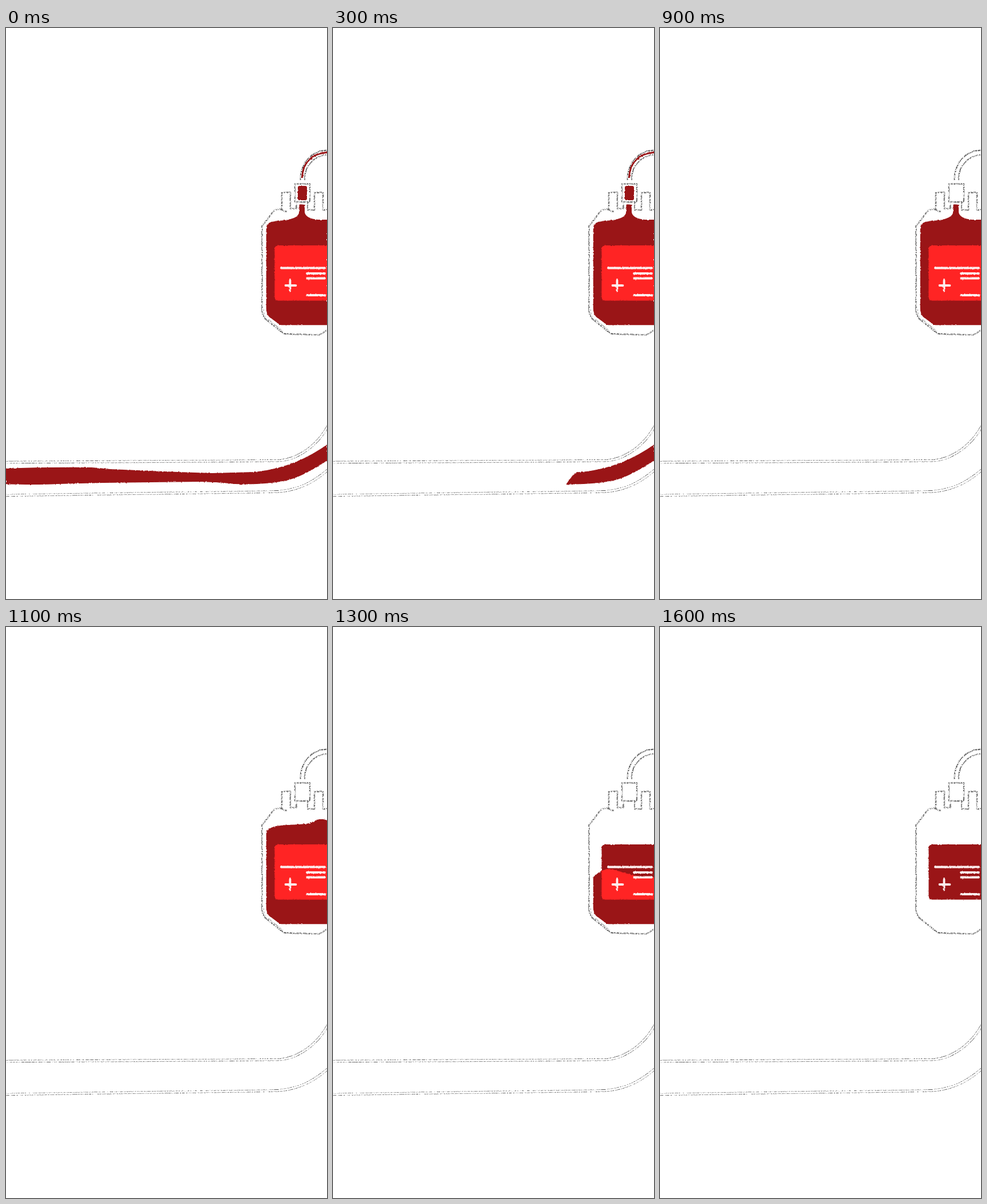
Write an HTML page that moves like this. It is 561x998 px and loops after 1900 ms.

```html
<!DOCTYPE html>
<html lang="en">
<head>
<meta charset="utf-8">
<title>Draining blood bag</title>
<style>
  html, body { margin: 0; width: 100%; height: 100%; overflow: hidden; background: #fff; }
  svg { display: block; width: 100%; height: 100%; }
  .blood { fill: #9a1517; }
  .feed { fill: none; stroke: #9a1517; stroke-width: 3; }
  .print { fill: none; stroke: #fdeeee; stroke-width: 3.8; stroke-linecap: round; }
  .shell { fill: none; stroke: #555; stroke-width: 2.4; stroke-linejoin: round; }
</style>
</head>
<body>
<svg viewBox="0 0 561 998">
  <defs>
    <filter id="grain" filterUnits="userSpaceOnUse" x="0" y="0" width="561" height="998" color-interpolation-filters="sRGB">
      <feTurbulence type="fractalNoise" baseFrequency=".5" numOctaves="2" seed="4"/>
      <feColorMatrix values="0 0 0 0 0  0 0 0 0 0  0 0 0 0 0  6 0 0 0 -2.5"/>
      <feComposite in="SourceGraphic" operator="in"/>
    </filter>
    <filter id="rough" filterUnits="userSpaceOnUse" x="0" y="0" width="561" height="998" color-interpolation-filters="sRGB">
      <feTurbulence type="fractalNoise" baseFrequency=".35" seed="2"/>
      <!-- Opaque noise keeps the displacement centred on zero. -->
      <feColorMatrix values="1 0 0 0 0  0 1 0 0 0  0 0 1 0 0  0 0 0 0 1" result="noise"/>
      <feDisplacementMap in="SourceGraphic" in2="noise" scale="3" xChannelSelector="R" yChannelSelector="G"/>
    </filter>
    <clipPath id="bagLevel"><path id="surface"/></clipPath>
    <clipPath id="tubeTail"><path id="tail" d="M0 798L11 783L20 775.5L60 600H900V900H0Z"/></clipPath>
    <g id="tubeWalls" fill="none">
      <path d="M-3 759L380 757L480 756C514 752 546 728 564 693"/>
      <path d="M-3 817L200 814L440 811L478 810C512 807 538 794 564 771"/>
    </g>
  </defs>

  <g filter="url(#grain)">
    <use href="#tubeWalls" stroke="#555" stroke-width="4.6"/>
    <use href="#tubeWalls" stroke="#fff" stroke-width="2.7"/>
    <g class="shell">
      <path d="M514.5 266C514.5 236 534 213.500 564 213.500M521.5 266C521.5 240 540 221.5 564 221.5"/>
      <path d="M505 272.500H531V304H505Z"/>
      <path d="M482 319V287.500H497V316H507.500V307M527.500 304V318H539V287.500H554V318H564"/>
      <path d="M491 321L486 320Q478 314 469 318.500L447.500 346V494Q448 504 454 509L485 534Q490 535 500 535L545 536.500Q551 536 564 525"/>
      <path stroke-width="1" clip-path="url(#bagLevel)" d="M450 492Q450 502 457 508L484 530"/>
    </g>
  </g>

  <g filter="url(#rough)">
    <g clip-path="url(#tubeTail)">
      <path class="blood" d="M-3 770Q70 767 150 768L182 771L300 776L360 778L435 776Q505 769 564 726V754Q520 784 490 791Q450 799 400 797L375 794.5L340 793L170 795L90 797Q50 799 -3 797Z"/>
    </g>
    <path id="feed" class="feed" pathLength="100" d="M517.5 262C518 237 534 218 564 217.5"/>
    <rect id="valve" class="blood" x="510" width="16" rx="3"/>
    <path class="blood" clip-path="url(#bagLevel)" d="M512.5 308.5H522V322Q524 333 545 335H570V519.300H481Q478 519 475 516L460 505Q454.800 500 454.800 490V352Q455 342 462 339.5C476 335 488 338 500 333Q513 329 512.5 319Z"/>
    <rect class="blood" x="469.5" y="380" width="110" height="96.5" rx="6"/>
    <g clip-path="url(#bagLevel)"><rect x="469.5" y="380" width="110" height="96.5" rx="6" fill="#ff2424"/></g>
    <path class="print" d="M481 419.5H557M526 429H557M526 437.5H557M526 467H557M488.500 450H506.500M496.5 441V459"/>
  </g>
</svg>
<script>
  const LOOP = 1900, STEP = 100, FIRST_DROP = 11;
  const surfaceX = [455, 468, 485, 510, 530, 548, 562];
  // Height of the sloshing surface at each x, one row per step.
  const levels = [
    [356, 349, 346.5, 345, 343, 336, 338],
    [402, 396, 390, 384, 381, 381, 385],
    [437, 427, 423, 430, 435, 437, 437],
    [472, 468, 468, 473, 478, 478, 476],
    [508, 506, 504, 501, 499, 499, 501],
  ];
  const part = id => document.getElementById(id);
  const clamp = (v, lo, hi) => Math.min(hi, Math.max(lo, v));

  function smoothPath(xs, ys) {
    const at = i => { const k = clamp(i, 0, xs.length - 1); return [xs[k], ys[k]]; };
    let d = `M${at(0)}`;
    for (let i = 0; i < xs.length - 1; i++) {
      const [before, a, b, after] = [at(i - 1), at(i), at(i + 1), at(i + 2)];
      const c1 = a.map((v, k) => v + (b[k] - before[k]) / 6);
      const c2 = b.map((v, k) => v - (after[k] - a[k]) / 6);
      d += `C${c1} ${c2} ${b}`;
    }
    return d;
  }

  function surfacePath(step) {
    if (step < FIRST_DROP) return 'M440 300H580V540H440Z';
    const ys = levels[step - FIRST_DROP];
    return ys ? `${smoothPath(surfaceX, ys)}H580V540H440V${ys[0]}Z` : 'M0 0Z';
  }

  function draw(step) {
    const tailX = step === 0 ? -80 : step < 5 ? 407 + (step - 3) * 130 : 700;
    part('tail').setAttribute('transform', `translate(${tailX} 0)`);

    const feedLeft = step < 6 ? 100 : step === 6 ? 57 : step === 7 ? 22 : 0;
    part('feed').setAttribute('stroke-dasharray', `${feedLeft} 200`);
    part('feed').setAttribute('visibility', feedLeft ? 'visible' : 'hidden');

    const valveTop = step < 8 ? 276 : step === 8 ? 288 : 301;
    part('valve').setAttribute('y', valveTop);
    part('valve').setAttribute('height', 301 - valveTop);

    part('surface').setAttribute('d', surfacePath(step));
  }

  let shown = -1;
  function tick() {
    const step = Math.floor(performance.now() % LOOP / STEP);
    if (step !== shown) draw(shown = step);
    requestAnimationFrame(tick);
  }
  tick();
</script>
</body>
</html>
```
